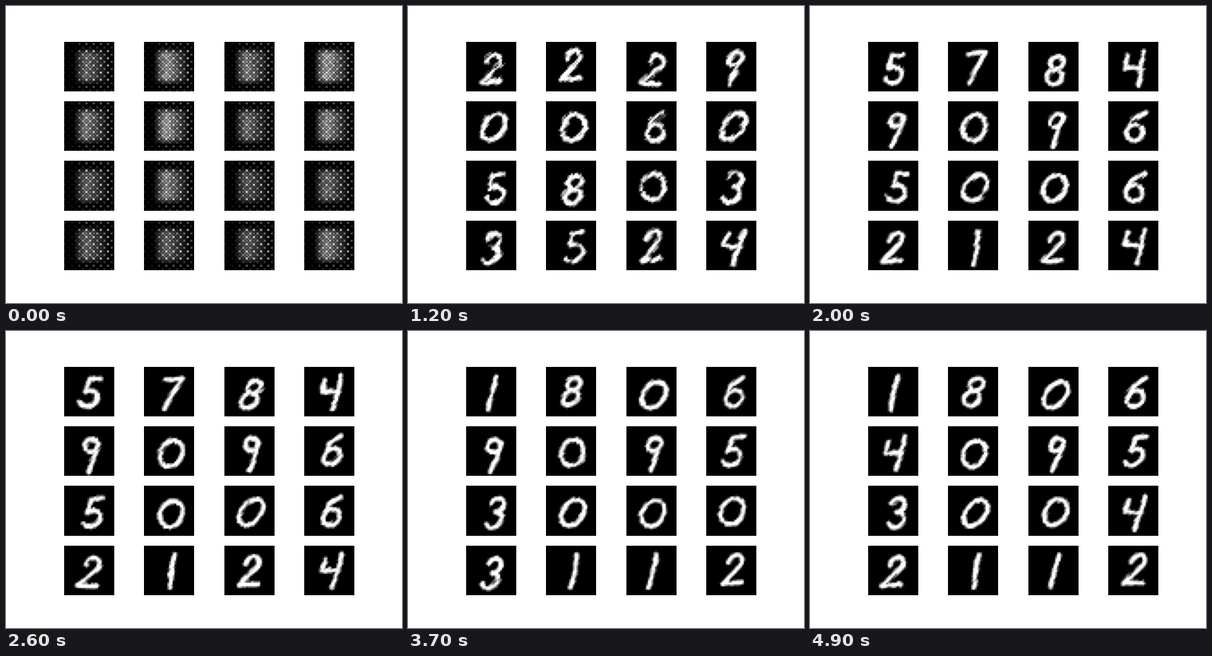
Write a matplotlib script that moves like this. It is 640 px wide and 480 px high and loops after 5.1 s.

```python
import numpy as np
import matplotlib.pyplot as plt
from matplotlib.animation import FuncAnimation

GRID, CELL = 28, 80.4
FRAMES, LAST = 51, 49

# The digit each of the 16 cells resembles around a given training epoch.
LABELS = {
    5: "4744520271201220",
    12: "2229006058033524",
    20: "5784909650062124",
    32: "1800409630003116",
    41: "1806909530003112",
    49: "1806409530042112",
}

row, col = np.mgrid[:GRID, :GRID]
px, py = (col + 0.5) * CELL / GRID, (row + 0.5) * CELL / GRID
centred = np.clip(1.6 - np.hypot(px - 42, py - 42) / 30, 0, 1)


def arc(cx, cy, rx, ry, start=0, stop=360):
    angle = np.radians(np.linspace(start, stop, 14))
    return np.column_stack([cx + rx * np.cos(angle), cy + ry * np.sin(angle)])


def line(*coords):
    """Polyline resampled so that it can bend."""
    points = np.reshape(coords, (-1, 2))
    at = np.linspace(0, len(points) - 1, 4 * len(points) - 3)
    return np.column_stack([np.interp(at, np.arange(len(points)), axis) for axis in points.T])


# Skeletons in a box from -1 to 1, y pointing down.
DIGITS = {
    "0": [arc(0, 0, 0.95, 0.78)],
    "1": [line(0, -1, 0, 0.95)],
    "2": [np.vstack([arc(0, -0.45, 0.55, 0.45, 180, 380), line(-0.7, 0.8, 0.85, 0.75)])],
    "3": [arc(0, -0.45, 0.55, 0.42, -160, 90), arc(0, 0.42, 0.65, 0.46, -90, 150)],
    "4": [line(-0.8, -0.7, -0.9, 0, 0.5, 0), line(0.5, -0.95, 0.4, 1.05)],
    "5": [line(0.6, -0.85, -0.3, -0.8, -0.4, -0.1), arc(0, 0.35, 0.75, 0.48, -125, 150)],
    "6": [arc(0.1, 0.35, 0.7, 0.48), line(0.6, -0.85, -0.3, -0.4, -0.6, 0.35)],
    "7": [line(-0.7, -0.75, 0.7, -0.8, -0.1, 1)],
    "8": [arc(0, -0.42, 0.55, 0.38), arc(0, 0.4, 0.65, 0.44)],
    "9": [arc(-0.05, -0.45, 0.55, 0.38), line(0.5, -0.6, 0.3, 0.2, 0, 1.1)],
}


def untrained(cell):
    """Checkered lattice of dots over a hazy square."""
    rng = np.random.default_rng(cell)
    rise = np.clip((col - 5) / 6, 0, 1)
    haze = rise * np.clip((25 - col) / 12, 0, 1)
    haze = haze * np.clip((row - 3) / 4, 0, 1) * np.clip((24 - row) / 4, 0, 1)
    main = (col % 4 == 0) & (row % 4 == 1)
    cross = (col % 4 == 2) & (row % 4 == 3)
    spread = 0.1 + 0.7 * rise * np.where((row > 3) & (row < 23), 1, 0.5)
    checker = np.where((row + col) % 2, 1, 0.5)
    grain = rng.uniform(0.7, 1.1, row.shape)
    return np.clip((main + 0.5 * cross) * spread + rng.uniform(0.4, 0.85) * haze * checker * grain, 0, 1)


def streaks(rng):
    """Smooth noise drawn out along the writing slant."""
    noise = rng.normal(size=(GRID, GRID))
    noise = sum(np.roll(noise, (k, -k), (0, 1)) for k in range(3))
    noise = noise + np.roll(noise, 1, 0) + np.roll(noise, 1, 1)
    return noise / noise.std()


def place(points, cell, tick):
    """Put a skeleton in its cell; slow waves bend it, less as training goes on."""
    rng = np.random.default_rng(100 + cell)
    centre = rng.normal((43, 43), 1.2)
    slant = rng.uniform(0.15, 0.32)
    phase = rng.uniform(0, 2 * np.pi, 2) + tick * rng.uniform(0.3, 0.8, 2)
    bend = 1.2 + 5 * np.exp(-tick / 8)
    x, y = points[:, 0] * 19, points[:, 1] * 27
    x, y = x - slant * y + bend * np.sin(y / 13 + phase[0]), y + bend * np.sin(x / 13 + phase[1])
    return np.column_stack([x, y]) + centre


def glyph(digit, cell, tick):
    gap = np.full((GRID, GRID), 10.0)
    for skeleton in DIGITS[digit]:
        points = place(skeleton, cell, tick)
        for (x0, y0), (x1, y1) in zip(points, points[1:]):
            dx, dy = x1 - x0, y1 - y0
            t = np.clip(((px - x0) * dx + (py - y0) * dy) / (dx * dx + dy * dy + 1e-9), 0, 1)
            gap = np.minimum(gap, np.hypot(px - x0 - t * dx, py - y0 - t * dy))
    rough = 0.8 + 4 * np.exp(-tick / 6)
    noise = streaks(np.random.default_rng([tick, cell])) * centred
    return np.clip((3.7 - gap + rough * noise) / 3.4 + 0.5, 0, 1)


def cell_image(tick, cell):
    if tick == 0:
        return untrained(cell)
    epoch = min(LABELS, key=lambda key: abs(key - tick))
    mix = max(1 - tick / 3, 0)
    return (1 - mix) * glyph(LABELS[epoch][cell], cell, tick) + mix * untrained(cell)


fig, axes = plt.subplots(4, 4, figsize=(6.4, 4.8), dpi=100)
fig.subplots_adjust(left=0.125, right=0.9, bottom=0.11, top=0.88, wspace=0.2, hspace=0.2)
pictures = []
for ax in axes.flat:
    ax.axis("off")
    pictures.append(ax.imshow(np.zeros((GRID, GRID)), cmap="gray", vmin=0, vmax=1))


def update(frame):
    for cell, picture in enumerate(pictures):
        picture.set_data(cell_image(min(frame, LAST), cell))
    return pictures


anim = FuncAnimation(fig, update, frames=FRAMES, interval=100, repeat=True, repeat_delay=0)
plt.show()
```
